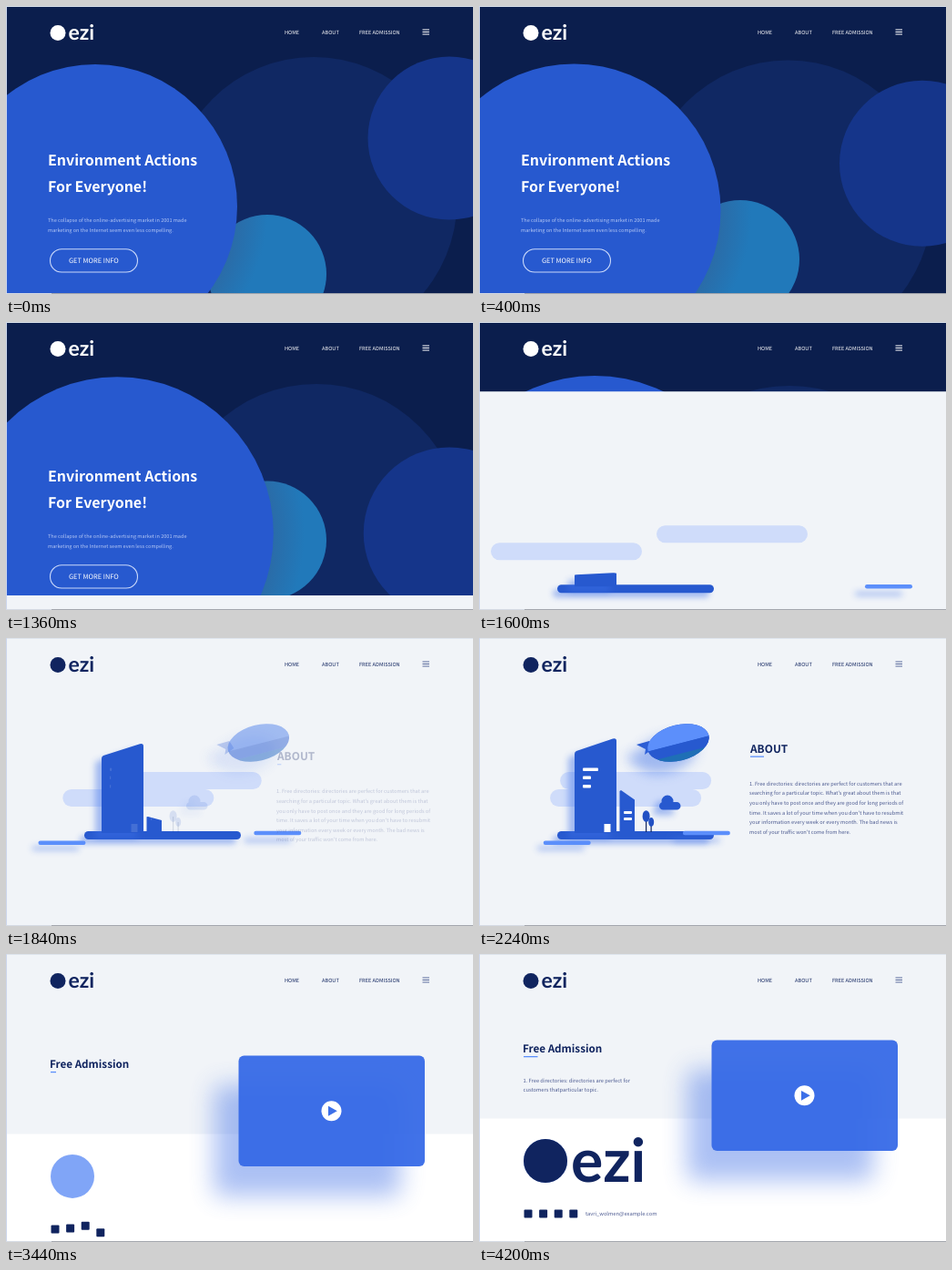
Write an HTML page with a canvas that moves like this. It is 513x316 px and loops after 7800 ms.

```html
<!DOCTYPE html>
<html lang="en">
<head>
<meta charset="utf-8">
<title>Landing page walkthrough</title>
<style>
  html, body { margin: 0; width: 100%; height: 100%; overflow: hidden; background: #f1f4f8; }
  canvas { display: block; width: 513px; height: 316px; }
</style>
</head>
<body>
<canvas></canvas>
<script>
const W = 513, H = 316, LOOP = 7800, STEP = 80, LAST = 4200;
const NAVY = '#10245f', BLUE = '#2759cf', LIGHT = '#5c8ffb', PAGE = '#f1f4f8', COPY = '#4d5b91';
const SANS = '"Noto Sans CJK SC", "Noto Sans CJK JP", "Noto Sans", sans-serif';
const BRAND = 'Lato, sans-serif';

const canvas = document.querySelector('canvas');
const ctx = canvas.getContext('2d');
const scale = window.devicePixelRatio || 1;
canvas.width = W * scale;
canvas.height = H * scale;
ctx.textRendering = 'geometricPrecision';

// ---- timing ----
let now = 0;
const clamp = v => Math.min(1, Math.max(0, v));
const progress = (start, length) => clamp((now - start) / length);
const ease = (start, length) => {
  const p = progress(start, length);
  return p < .5 ? 4 * p ** 3 : 1 - 4 * (1 - p) ** 3;
};
const settle = start => Math.min(2.5, Math.exp((start - now) / 180));
const along = (a, b, c) => now < 800 ? a + (b - a) * now / 800 : b + (c - b) * Math.min(1, (now - 800) / 800);

// ---- drawing helpers ----
function group(draw, { x = 0, y = 0, alpha = 1 } = {}) {
  ctx.save();
  ctx.translate(x, y);
  ctx.globalAlpha *= alpha;
  draw();
  ctx.restore();
}
function shape(color, build) {
  ctx.fillStyle = color;
  ctx.beginPath();
  build();
  ctx.fill();
}
const disc = (x, y, r, color) => shape(color, () => ctx.arc(x, y, r, 0, 7));
const oval = (x, y, rx, ry, color) => shape(color, () => ctx.ellipse(x, y, rx, ry, 0, 0, 7));
const box = (x, y, w, h, color, r = 0) => shape(color, () => ctx.roundRect(x, y, w, h, r));
const polygon = (points, color) => shape(color, () => points.forEach(p => ctx.lineTo(...p)));
function text(str, x, y, size, color, weight = 400, family = SANS) {
  ctx.font = `${weight} ${size}px ${family}`;
  ctx.fillStyle = color;
  ctx.fillText(str, x, y);
}
function shadow(color, dx, dy, blur) {
  ctx.shadowColor = color;
  ctx.shadowOffsetX = dx * scale;
  ctx.shadowOffsetY = dy * scale;
  ctx.shadowBlur = blur * scale;
}
const shaded = (draw, dx = -7, dy = 6, blur = 7) => group(() => {
  shadow('rgba(60,110,230,.45)', dx, dy, blur);
  draw();
});

// ---- shared header ----
function header(color, lines) {
  disc(57, 29.5, 8.5, color);
  text('ezi', 68.5, 37, 23, color, 700, BRAND);
  text('HOME', 306, 30.5, 5.65, color, 500);
  text('ABOUT', 347, 30.5, 5.65, color, 500);
  text('FREE ADMISSION', 388, 30.5, 5.65, color, 500);
  for (const y of [25.5, 28, 30.5]) box(457.5, y, 7.5, 1, lines);
}

// Each page slides up over the one before it.
function page(top, draw) {
  if (top >= H) return;
  ctx.save();
  ctx.beginPath();
  ctx.rect(0, top, W, H);
  ctx.clip();
  ctx.fillStyle = PAGE;
  ctx.fillRect(0, 0, W, H);
  group(draw, { y: top });
  header(NAVY, '#5b6b9c');
  ctx.restore();
}

// ---- first page ----
function hero() {
  ctx.fillStyle = '#0b1e4d';
  ctx.fillRect(0, 0, W, H);
  disc(along(338, 341, 341), along(213.5, 222, 231), along(157.5, 159, 161), '#102863');
  disc(487, along(145, 200.5, 245), along(89.5, 92.5, 95), '#15358a');

  // The large disc shades the teal one along its rim.
  const x = along(98, 111, 127), y = along(220, 229, 233), r = along(156, 166, 174);
  const teal = ctx.createRadialGradient(x, y, r, x, y, r + 34);
  teal.addColorStop(0, '#2a6ca8');
  teal.addColorStop(1, '#2179ba');
  disc(287, along(294, 262, 230), 65, teal);
  disc(x, y, r, BLUE);

  text('Environment Actions', 46, 175, 15.95, '#fff', 700);
  text('For Everyone!', 46, 203.5, 15.95, '#fff', 700);
  text('The collapse of the online-advertising market in 2001 made', 46, 236.5, 5.55, '#b4c7f4');
  text('marketing on the Internet seem even less compelling.', 46, 247.5, 5.55, '#b4c7f4');
  ctx.strokeStyle = '#c9d8fa';
  ctx.lineWidth = 1.1;
  ctx.beginPath();
  ctx.roundRect(48.5, 266.8, 96, 25.2, 12.6);
  ctx.stroke();
  text('GET MORE INFO', 69, 282, 7.4, '#fff');
  header('#fff', '#fff');
}

// ---- second page ----
function grown(amount, draw) {
  ctx.save();
  ctx.translate(0, 214);
  ctx.scale(1, amount);
  ctx.translate(0, -214);
  draw();
  ctx.restore();
}

function city() {
  const slide = settle(1600), tall = ease(1415, 560), small = ease(1620, 480);
  const detail = ease(1700, 440);

  box(86 + 109 * slide, 147, 166, 19, '#cfdcfa', 9.5);
  box(80 - 67 * slide, 166, 166, 19, '#cfdcfa', 9.5);

  shaded(() => box(86, 212, 172, 9, BLUE, 4.5), -5, 5, 6);
  shaded(() => box(75 - 150 * slide, 222.5, 52, 4.5, LIGHT, 2.25));
  shaded(() => grown(tall, () => shape(BLUE, () => {
    ctx.moveTo(105, 214);
    ctx.lineTo(105, 127);
    ctx.quadraticCurveTo(105, 125, 107, 124);
    ctx.lineTo(147, 110.5);
    ctx.quadraticCurveTo(151, 109.5, 151, 113);
    ctx.lineTo(151, 214);
  })));
  grown(small, () => polygon([[154.5, 214], [154.5, 168], [156, 167], [171, 177.5], [171, 214]], BLUE));

  group(() => {
    box(114, 142.5, 17 * detail, 3.5, '#fff', 1);
    for (const y of [151.5, 161]) box(114, y, 9 * detail, 3.5, '#fff', 1);
    for (const y of [190, 197]) box(159, y, 9 * detail, 3, '#fff', 1);
    box(137.5, 204, 7, 9, '#fff');
    box(183, 196, 1.2, 17, NAVY);
    box(188.5, 202, 1.2, 11, NAVY);
    oval(183.6, 195.5, 4, 6.3, '#2150c3');
    oval(189.2, 202, 3, 5, '#2150c3');
    shaded(() => shape(BLUE, () => {
      ctx.roundRect(198, 180, 23.5, 8.5, 4.25);
      ctx.moveTo(213.5, 179);
      ctx.arc(207, 179, 6.5, 0, 7);
    }));
  }, { alpha: detail });

  shaded(() => box(218 + 206 * slide, 211.8, 52, 4.4, LIGHT, 2.2), -11, 8, 7);
  blimp();
}

function blimp() {
  const enter = ease(1620, 540);
  group(() => {
    shaded(() => {
      polygon([[173, 117], [187, 113], [192, 121], [182, 128], [183, 122]], BLUE);
      ctx.translate(219, 115);
      ctx.rotate(-.25);
      oval(0, 0, 34.5, 19.5, BLUE);
    }, -14, 13, 14);
    ctx.translate(219, 115);
    ctx.rotate(-.25);
    ctx.beginPath();
    ctx.ellipse(0, 0, 34.5, 19.5, 0, 0, 7);
    ctx.clip();
    box(-40, -25, 80, 26, LIGHT);
    box(-40, 1, 80, 11, BLUE);
    box(-40, 12, 80, 12, '#1f6fb6');
  }, { x: 80 * (1 - enter), alpha: enter });
}

function about() {
  city();
  const shown = ease(1640, 480);
  group(() => {
    text('ABOUT', 298, 125.5, 11.9, NAVY, 700);
    box(298, 129.5, 15 * shown, 1.3, LIGHT);
    [
      "1. Free directories: directories are perfect for customers that are",
      "searching for a particular topic. What's great about them is that",
      "you only have to post once and they are good for long periods of",
      "time. It saves a lot of your time when you don't have to resubmit",
      "your information every week or every month. The bad news is",
      "most of your traffic won't come from here."
    ].forEach((line, i) => text(line, 297, 161.7 + i * 10.65, 5.69, COPY));
  }, { y: 12 * (1 - shown), alpha: shown });
}

// ---- third page ----
function admission() {
  const wobble = 1 - ease(3200, 640);
  const copy = ease(3460, 560), word = ease(3460, 640), mail = ease(3560, 600);
  box(0, 180.5, W, H, '#fff');

  text('Free Admission', 48, 108, 11.65, NAVY, 700);
  box(49, 112, 6 + 9.5 * ease(3400, 500), 1.3, LIGHT);
  group(() => {
    text('1. Free directories: directories are perfect for', 48.5, 140.5, 5.72, COPY);
    text('customers thatparticular topic.', 48.5, 151, 5.72, COPY);
  }, { y: 8 * (1 - copy), alpha: copy });

  group(() => {
    shadow('rgba(60,108,230,.46)', -27, 32.5, 27);
    box(255.5, 94.5, 204.5, 121.5, 'rgba(54,106,231,.94)', 6);
  });
  disc(357.5, 155.3, 11, '#fff');
  polygon([[354, 149.9], [354, 160.7], [363.8, 155.3]], '#3d70e8');

  disc(73, 227, 24, '#80a5f7');
  group(() => disc(73, 227, 24, NAVY), { alpha: word });
  group(() => text('ezi', 101, 250, 66, NAVY, 700, BRAND), { y: 14 * (1 - word), alpha: word });

  [0, -2, -8, 8].forEach((lift, i) =>
    box(49.5 + 16.6 * i, 280.5 + lift * wobble * .6, 9, 9, NAVY, 1));
  group(() => text('tavri_wolmen@example.com', 117, 287, 5.75, COPY), { alpha: mail });
}

// ---- thin edge around the stage ----
function frameEdge() {
  box(0, 0, W, 1, '#dde4ec');
  box(0, 0, 1, H, '#ccd6ec');
  box(0, H - 1, W, 1, '#d5dae3');
  box(50, H - 1, W - 50, 1, '#a3a6ad');
}

function render(clock) {
  const t = clock % LOOP;
  now = t >= LAST ? LAST : Math.floor(t / STEP) * STEP;
  ctx.setTransform(scale, 0, 0, scale, 0, 0);
  hero();
  page(H * (1 - ease(1211, 640)), about);
  page(H * (1 - ease(2952, 640)), admission);
  frameEdge();
}

const start = performance.now();
function tick() {
  render(performance.now() - start);
  requestAnimationFrame(tick);
}
tick();
</script>
</body>
</html>
```
